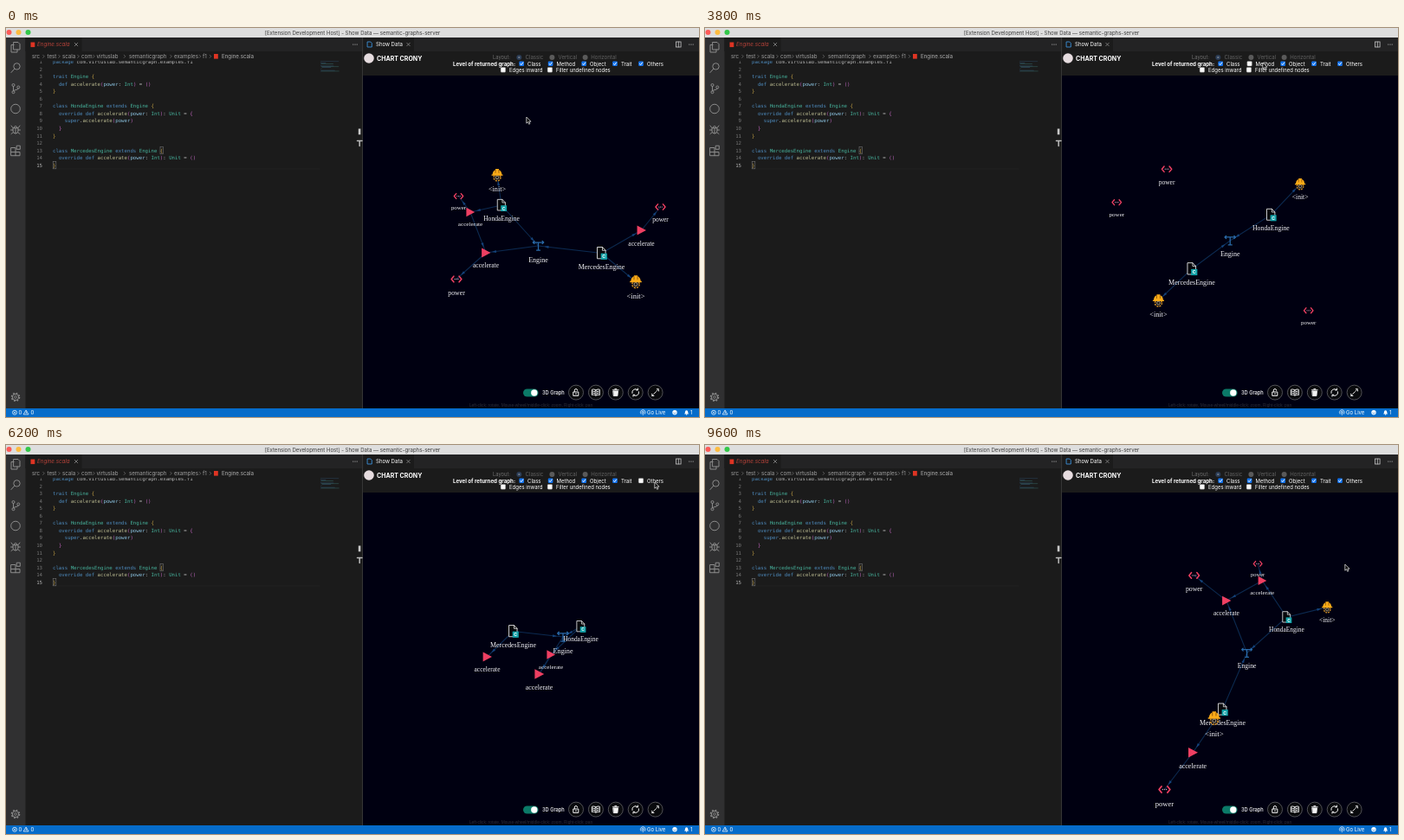
An HTML page that plays this animation: 800x450 px, repeating every 9650 ms.

```html
<!DOCTYPE html>
<html>
<head>
<meta charset="utf-8">
<style>
html, body { margin: 0; width: 100%; height: 100%; overflow: hidden; background: #1b1b1b; }
svg { display: block; width: 800px; height: 450px; font-family: Inter, sans-serif; }
.code { font-family: "DejaVu Sans Mono", monospace; font-size: 5.71px; opacity: .88; }
.label { font-family: "Liberation Serif", serif; font-size: 8px; fill: #f4f4f6; text-anchor: middle; }
.line { fill: none; stroke-linecap: round; stroke-linejoin: round; }
</style>
</head>
<body>
<svg id="stage" viewBox="0 0 800 450" xmlns="http://www.w3.org/2000/svg">
  <defs><clipPath id="view"><rect x="412" y="55" width="388" height="385"/></clipPath>
  <clipPath id="pane"><rect x="23" y="38.3" width="389" height="400"/></clipPath></defs>
  <g id="shell"></g>
  <g id="graph" clip-path="url(#view)"><g id="edges"></g><g id="nodes"></g></g>
  <g id="controls"></g>
  <path id="pointer" d="M0 0V7.2L1.7 5.7L2.9 8.3L4.1 7.7L3 5.2H5.2Z" fill="#111" stroke="#f2f2f2" stroke-width=".7"/>
</svg>
<script>
const LOOP = 9650, STEP = 50;
const $ = id => document.getElementById(id);
const rect = (x, y, w, h, fill, more = '') =>
  `<rect x="${x}" y="${y}" width="${w}" height="${h}" fill="${fill}" ${more}/>`;
const circle = (x, y, r, fill, more = '') => `<circle cx="${x}" cy="${y}" r="${r}" fill="${fill}" ${more}/>`;
const line = (d, color, w = 1, more = '') =>
  `<path class="line" d="${d}" stroke="${color}" stroke-width="${w}" ${more}/>`;
const esc = s => s.replace(/</g, '&lt;').replace(/>/g, '&gt;');
const text = (x, y, s, size, fill, more = '') =>
  `<text x="${x}" y="${y}" font-size="${size}" fill="${fill}" ${more}>${esc(s)}</text>`;
const at = (x, y, body) => `<g transform="translate(${x} ${y})">${body}</g>`;
const dots = (x, y) => [-2.2, 0, 2.2].map(d => circle(x + d, y, .6, '#c5c5c5')).join('');
const cross = (x, y) => line(`M${x - 1.8} ${y - 1.8}l3.6 3.6m0 -3.6l-3.6 3.6`, '#999', .7);

// ---------- window, activity bar, editor ----------
function windowFrame() {
  const lights = ['#fc5b57', '#fdbc40', '#34c84a'].map((c, i) => circle(3.5 + i * 11, 5, 3, c)).join('');
  return rect(0, 0, 800, 450, '#1b1b1b') + rect(0, 0, 800, 11, '#dedede') + lights +
    text(400, 7.7, '[Extension Development Host] - Show Data — semantic-graphs-server', 6.06, '#3c3c3c', 'text-anchor="middle"') +
    rect(0, 11, 22.5, 429, '#303031') + rect(22.5, 11, 777.5, 16, '#232324') +
    rect(22.5, 11, 65, 16, '#1b1b1b') + rect(412.5, 11, 58.5, 16, '#1b1b1b') +
    rect(411, 11, 1, 429, '#363636');
}

function activityBar() {
  const g = '#8b8b8b', l = (d, w = 1) => line(d, g, w);
  const teeth = circle(0, 0, 4.5, 'none', `stroke="${g}" stroke-width="1.6" stroke-dasharray="1.77 1.77"`);
  return at(11, 22, l('M-2 -5.5H3L5 -3.5V3H-2ZM-2 -2.5H-5V6H2V3')) +
    at(11, 46, l('M-1.5 1.5L-5 5.5') + circle(1.5, -1.6, 3.7, 'none', `stroke="${g}"`)) +
    at(11, 70, [[-2.5, -4], [-2.5, 4.2], [3.3, -1.5]].map(p => circle(...p, 1.5, 'none', `stroke="${g}"`)).join('') +
      l('M-2.5 -2.5V2.7M3.3 0C3.3 2 -1 1 -2.3 2.6')) +
    circle(11, 93.5, 5.3, 'none', `stroke="${g}"`) +
    at(11, 117, l('M-3 -1V2a3 3 0 0 0 6 0V-1ZM-2 -1a2 2.5 0 0 1 4 0M-5.5 1H-3M3 1H5.5M-5 -4L-3 -1.5M5 -4L3 -1.5M-5 5.5L-2.6 3.6M5 5.5L2.6 3.6M0 -1V5')) +
    at(11, 141.5, l('M-5 -3H0V2H5V6.2H-5ZM0 2V6.2M-5 2H0M1.6 -5.3H5.3V-1.2H1.6Z')) +
    at(11, 427, teeth + circle(0, 0, 3.6, 'none', `stroke="${g}"`) + circle(0, 0, 1.4, 'none', `stroke="${g}" stroke-width=".8"`));
}

const CODE = `package com.virtuslab.semanticgraph.examples.f1

trait Engine {
  def accelerate(power: Int) = ()
}

class HondaEngine extends Engine {
  override def accelerate(power: Int): Unit = {
    super.accelerate(power)
  }
}

class MercedesEngine extends Engine {
  override def accelerate(power: Int): Unit = ()
}`.split('\n');

function tint(word, row, col) {
  if (/^(package|trait|class|extends|override|def|super)$/.test(word)) return '#569cd6';
  if (/[{}]/.test(word)) return col > 40 || (row === 9) ? '#da70d6' : '#e0b84c';
  if (/[()]/.test(word)) return '#d070d0';
  if (/^[A-Z]/.test(word)) return '#4ec9b0';
  if (word === 'accelerate') return '#d4d4a4';
  if (word === 'power') return '#9cdcfe';
  return '#cfcfcf';
}

function editor() {
  let out = '';
  CODE.forEach((src, row) => {
    const y = (41 + row * 8.56).toFixed(2);
    out += text(42, y, String(row + 1), 5.71, row === 14 ? '#c8c8c8' : '#858585', 'text-anchor="end"');
    for (const m of src.matchAll(/\w+|\S/g))
      out += text((54 + m.index * 3.44).toFixed(2), y, m[0], 5.71, tint(m[0], row, m.index));
  });
  out += line('M54 163H362', '#262626', .8);
  for (const [x, y] of [[178, 137.6], [54.2, 154.6]])
    out += rect(x, y, 3.6, 8.2, 'none', 'stroke="#808080" stroke-width=".6"');
  let map = '';
  CODE.forEach((src, i) => {
    const pad = src.search(/\S/);
    if (pad >= 0) map += rect(363 + pad * .45, 38.5 + i * .86, (src.length - pad) * .45, .55, i % 2 ? '#386c6a' : '#35597a');
  });
  const crumbs = [[30, 'src'], [47.5, 'test'], [65, 'scala'], [87, 'com'], [104.5, 'virtuslab'],
    [142, 'semanticgraph'], [194, 'examples'], [227, 'f1']];
  const gaps = [43.5, 61.5, 83.5, 101.5, 137, 190.5, 224, 236];
  return `<g class="code" clip-path="url(#pane)">${out}${map}</g>` +
    rect(28.5, 16.5, 4.8, 5.6, '#de3423') + text(36, 21.2, 'Engine.scala', 6.2, '#b8433a', 'font-style="italic"') +
    cross(81, 19) + dots(403, 19) +
    crumbs.map(([x, s]) => text(x, 35, s, 6.2, '#a0a0a0')).join('') +
    gaps.map(x => line(`M${x - .8} 31.2l1.6 1.6l-1.6 1.6`, '#858585', .6)).join('') +
    rect(240, 30, 4.8, 5.6, '#de3423') + text(249, 35, 'Engine.scala', 6.2, '#b0b0b0') +
    rect(406.8, 116.5, 2.6, 6.8, '#c8c8c8') + line('M405.5 130.5H411M408.2 130.5V136.5', '#bbb', 1.5);
}

function statusBar() {
  const w = '#fff', blue = '#066cca';
  return rect(0, 440, 800, 10, blue) +
    circle(10, 444.8, 2.5, 'none', 'stroke="#fff" stroke-width=".7"') + line('M9 443.8l2 2m0 -2l-2 2', w, .6) +
    text(14.5, 447, '0', 6, w) + line('M23.3 442.3L26 447H20.6ZM23.3 443.9V445.5', w, .7) + text(28.5, 447, '0', 6, w) +
    line('M733 446.4a2.9 2.9 0 1 1 4.6 0M734.2 445.3a1.3 1.3 0 1 1 2.2 0M735.3 444.7V447.7', w, .7) +
    text(740, 447, 'Go Live', 6, w) +
    circle(772, 444.7, 2.7, w) + line('M770.6 445.4q1.4 1.6 2.8 0', blue, .6) +
    `<path d="M783 446.5q1 -1 1 -2.6a1.6 1.6 0 0 1 3.2 0q0 1.6 1 2.6Z" fill="#fff"/>` + circle(785.6, 447, .8, w) +
    text(790, 447, '1', 6, w);
}

// ---------- graph panel ----------
const BOXES = [[595.2, 602, 'Class'], [628.6, 635.6, 'Method'], [667.2, 674, 'Object'], [703, 710, 'Trait'], [733, 740, 'Others']];
const whiteBox = (x, y) => rect(x - 2.8, y - 2.8, 5.6, 5.6, '#f8f8f8', 'rx="1" stroke="#777" stroke-width=".4"');

function panel() {
  const radio = (x, on) => circle(x, 34, 3, on ? '#2c3e57' : '#5a5a5a') + (on ? circle(x, 34, 1.1, '#78808c') : '');
  return line('M417.5 16H420.8L422.3 17.5V22H417.5Z', '#3b8fd9', .9) + text(427, 21.2, 'Show Data', 6.05, '#fff') + cross(464.5, 19) +
    rect(773.5, 16, 5.6, 6, 'none', 'stroke="#c5c5c5" stroke-width=".8"') + line('M776.3 16V22', '#c5c5c5', .8) + dots(791, 19) +
    rect(412, 55, 388, 385, '#000011') +
    circle(419, 35, 5.8, '#e6dcdf') + text(428, 37.6, 'CHART CRONY', 7.02, '#fff', 'font-weight="700"') +
    text(562, 36.2, 'Layout:', 5.8, '#707070') +
    radio(592.3, 1) + radio(630.4) + radio(668.6) +
    [[599.5, 'Classic'], [637.5, 'Vertical'], [675.3, 'Horizontal']].map(([x, s]) => text(x, 36.2, s, 6.1, '#636363')).join('') +
    text(588, 43.7, 'Level of returned graph:', 6.15, '#fff', 'font-weight="700" text-anchor="end"') +
    BOXES.map(([, x, s]) => text(x, 43.7, s, 6, '#fff')).join('') +
    whiteBox(573.9, 48.4) + whiteBox(627.9, 48.4) +
    text(581, 50.7, 'Edges inward', 6, '#fff') + text(635, 50.7, 'Filter undefined nodes', 5.92, '#fff');
}

function controls() {
  const icons = [
    'M-2.8 -.6H2.8V3.8H-2.8ZM-1.7 -.8V-2.4a1.7 1.7 0 0 1 3.4 0M0 1V2.2',
    'M0 -2.6C-1.5 -3.8 -3 -3.8 -4.4 -3.3V3C-3 2.5 -1.5 2.5 0 3.6C1.5 2.5 3 2.5 4.4 3V-3.3C3 -3.8 1.5 -3.8 0 -2.6ZM0 -2.6V3.4M-3.2 -1.4l2 .5M-3.2 .6l2 .5M3.2 -1.4l-2 .5M3.2 .6l-2 .5',
    'M-3.4 -2.8H3.4M-1 -4H1M-2.6 -1.6H2.6L2.1 4H-2.1Z',
    'M-3.8 .8A3.9 3.9 0 0 1 2.5 -3M2.7 -4.6V-2.7H.8M3.8 -.8A3.9 3.9 0 0 1 -2.5 3M-2.7 4.6V2.7H-.8',
    'M-3.8 3.8L3.8 -3.8M1.7 -3.9H3.9V-1.7M-1.7 3.9H-3.9V1.7'];
  const extras = { 2: 'style="fill:#f4f4f4"', 4: 'stroke-dasharray="2.4 1.2"' };
  return rect(597, 417.4, 17.6, 9.2, '#0b7a68', 'rx="4.6"') + circle(609.8, 422, 3.7, '#fff') +
    text(619, 424.2, '3D Graph', 5.7, '#fff', 'font-weight="500"') +
    icons.map((d, i) => at(658 + i * 22.9, 421.6, circle(0, 0, 8.5, '#090a0d', 'stroke="#646468" stroke-width=".8"') +
      line(d, '#f4f4f4', 1, extras[i]))).join('') +
    text(606, 437.8, 'Left-click: rotate, Mouse-wheel/middle-click: zoom, Right-click: pan', 4.83, '#2c2d38',
      'text-anchor="middle" style="font-family:\'Liberation Sans\',sans-serif"') +
    `<g id="boxes"></g>`;
}

const ICONS = {
  trait: line('M-6 -4H6M0 -4V5M-2 5H2M-4.6 -5.6L-6.2 -4L-4.6 -2.4M4.6 -5.6L6.2 -4L4.6 -2.4', '#2a6aa8', 1.25),
  class: `<path d="M-5 -7H1L4.6 -3.2V6.3H-5Z" fill="#08080c" stroke="#e4e4e4" stroke-width=".9"/>` +
    line('M1 -7V-3.2H4.6', '#e4e4e4', .8) + rect(-.8, .2, 7.2, 7.2, '#12a2a8') +
    text(2.8, 5.8, 'C', 5.4, '#fff', 'text-anchor="middle" font-weight="700"'),
  init: circle(0, 2.8, 3.9, '#14121a', 'stroke="#c98a24" stroke-width="1.5" stroke-dasharray="1.9 1.16"') +
    circle(0, 2.8, 1.8, '#17151c', 'stroke="#d8c69c" stroke-width=".7"') +
    `<path d="M-6.4 .8V-.6H-5.4C-5.2 -3.8 -3.4 -5.4 -2 -5.8V-6.9H2V-5.8C3.4 -5.4 5.2 -3.8 5.4 -.6H6.4V.8Z" fill="#fbab18"/>` +
    line('M-1.9 -5.6V-2.6M1.9 -5.6V-2.6', '#8a5208', .8),
  method: `<path d="M-5.2 -5.8L5.8 0L-5.2 5.8Z" fill="#ee3f62"/>`,
  param: line('M-3.2 -3.4L-6 0L-3.2 3.4M3.2 -3.4L6 0L3.2 3.4', '#ee3f62', 1.6) +
    [-2, 0, 2].map(x => circle(x, 0, .65, '#c6a3b8')).join('')
};

const NODES = {
  E: ['trait', 'Engine'], H: ['class', 'HondaEngine'], M: ['class', 'MercedesEngine'],
  iH: ['init', '<init>'], iM: ['init', '<init>'],
  aE: ['method', 'accelerate'], aH: ['method', 'accelerate'], aM: ['method', 'accelerate'],
  pE: ['param', 'power'], pH: ['param', 'power'], pM: ['param', 'power']
};
const EDGES = 'H>E M>E H>iH M>iM E>aE H>aH M>aM aH>aE aE>pE aH>pH aM>pM'.split(' ').map(e => e.split('>'));

// "id x y labelSize" entries
const pose = s => Object.fromEntries(s.split(',').map(p => {
  const [id, ...v] = p.trim().split(' ');
  return [id, v.map(Number)];
}));

const opening = pose('E 614.5 252 8,H 572 205 7.6,M 687.5 260.5 8,iH 567 170 8.1,iM 727 293.5 8.5,aE 554 260 7.5,aH 536 213 7.1,aM 733.5 234 7.6,pE 520 290.5 7.8,pH 522.5 194.5 6.9,pM 755.5 207 7.4');
const noClass = pose('E 583 255 8.8,iH 711 114 6.1,aE 556.5 264 8.2,aH 558 250 7.3,aM 744.5 346 7.6,pE 511 277.5 8.8,pH 557 234.5 6.8,pM 711.5 365 7.2');
const upright = pose('E 612 227 8.1,H 637.5 287.5 8,M 627.5 160.5 7.9,iH 673 315 8.4,iM 615 113 8,aE 562.5 269 7.9,aH 596 306.5 7.3,aM 653.5 152 7.3,pE 515 278.5 8.2,pH 591 308.5 6.8,pM 672 165 6.5');
const noMethod = pose('E 606 246 8,H 655 215 7.8,M 560 280 8,iH 690 178 7.6,iM 520 318 8.2,pE 530 160 7.5,pH 700 330 7,pM 470 200 7');
const mirrored = pose('E 604 254.5 8.1,H 632.5 188.5 8,M 540 268 7.6,iH 643.5 232 7.8,iM 540.5 294 7.3,aE 682 258 8.2,aH 697.5 195 7.9,aM 510 225 7.4,pE 714.5 284 8.2,pH 711 184 7.2,pM 513.5 192 6.9');
const noOthers = pose('E 643 222 8.2,H 663.5 210 7.4,M 585.5 215.5 7.9,aE 615.5 265 7.9,aH 629 242.5 7.1,aM 555.5 245 7.5');
const tall = pose('E 626.5 240.5 7.7,H 672 199.5 7.4,M 597.5 305 7.9,iH 718.5 188 7.5,iM 587 312.5 8.9,aE 602 181 7.5,aH 642 160 7,aM 564 353 8,pE 564 154 7.8,pH 636 142 6.5,pM 531.5 395 8.5');
const DRIFT = { E: [-1, 0], H: [-1, 0], M: [0, .5], iH: [-1, 0], iM: [1, 3], aE: [0, -.5], aH: [1, -2.5], aM: [-.5, 2], pE: [1, -2.5], pH: [2, -4], pM: [-.5, 2.5] };

// Each reload bursts from the middle and passes through its pose at time `key`.
const SCENES = [
  { from: 0, pose: opening },
  { from: 1150, key: 1550, tau: 600, pose: noClass, off: 0 },
  { from: 2150, key: 2850, tau: 200, pose: upright },
  { from: 3150, key: 3900, tau: 350, pose: noMethod, off: 1 },
  { from: 4150, key: 4950, tau: 220, pose: mirrored },
  { from: 5850, key: 6200, tau: 500, pose: noOthers, off: 4 },
  { from: 7000, key: 8250, tau: 260, pose: tall, drift: true }
];
const MID = [612, 245];
const PATH = [[0, 602, 107], [400, 602, 107], [950, 608, 45], [2300, 608, 45], [2750, 645, 44],
  [4700, 645, 44], [4950, 655, 46], [5500, 750, 47], [7300, 750, 47], [7850, 740, 142], [LOOP, 740, 142]];

const clamp = k => Math.max(0, Math.min(1, k));
const smooth = k => k * k * (3 - 2 * k);

function place(scene, t) {
  const grow = s => 1 - Math.exp(-s / scene.tau);
  const g = scene.tau ? grow(t - scene.from + STEP) / grow(scene.key - scene.from + STEP) : 1;
  const k = scene.drift ? clamp((t - 8250) / 1350) : 0;
  const out = {};
  for (const id in scene.pose) {
    const [x, y, size] = scene.pose[id], [dx, dy] = DRIFT[id];
    out[id] = [MID[0] + (x - MID[0]) * g + dx * k, MID[1] + (y - MID[1]) * g + dy * k, size];
  }
  return out;
}

function drawEdges(spots) {
  return EDGES.filter(([a, b]) => spots[a] && spots[b]).map(([a, b]) => {
    const [x1, y1] = spots[a], [x2, y2] = spots[b];
    const len = Math.hypot(x2 - x1, y2 - y1) || 1;
    const angle = Math.atan2(y2 - y1, x2 - x1) * 180 / Math.PI;
    const k = Math.max(.5, 1 - 9 / len);
    return line(`M${x1} ${y1}L${x2} ${y2}`, '#0c2a50', 1.1) +
      `<path d="M2 0L-3 -1.5V1.5Z" fill="#14427a" transform="translate(${x1 + (x2 - x1) * k} ${y1 + (y2 - y1) * k}) rotate(${angle})"/>`;
  }).join('');
}

function pointerAt(t) {
  const i = PATH.findIndex(p => p[0] > t), [t0, x0, y0] = PATH[i - 1], [t1, x1, y1] = PATH[i];
  const k = smooth((t - t0) / (t1 - t0));
  return [x0 + (x1 - x0) * k - 1.2, y0 + (y1 - y0) * k - 4];
}

$('shell').innerHTML = windowFrame() + activityBar() + editor() + panel() + statusBar();
$('controls').innerHTML = controls();
$('nodes').innerHTML = Object.entries(NODES).map(([id, [kind, name]]) =>
  `<g id="n${id}">${ICONS[kind]}<text class="label" y="18.5">${esc(name)}</text></g>`).join('');

let shown = null;
function render(t) {
  const scene = SCENES.filter(s => s.from <= t).pop();
  const spots = place(scene, t);
  if (scene !== shown) {
    shown = scene;
    $('boxes').innerHTML = BOXES.map(([x], i) => i === scene.off ? whiteBox(x, 41.3) :
      rect(x - 2.8, 38.5, 5.6, 5.6, '#1475f0', 'rx="1"') + line(`M${x - 1.5} 41.4l1.1 1.3l2 -2.8`, '#fff', .9)).join('');
    Object.keys(spots).sort((a, b) => spots[a][2] - spots[b][2]).forEach(id => $('nodes').append($('n' + id)));
  }
  $('edges').innerHTML = drawEdges(spots);
  for (const id in NODES) {
    const p = spots[id], el = $('n' + id);
    el.style.display = p ? '' : 'none';
    if (p) el.setAttribute('transform', `translate(${p[0].toFixed(2)} ${p[1].toFixed(2)}) scale(${p[2] / 8})`);
  }
  $('pointer').setAttribute('transform', `translate(${pointerAt(t).map(v => v.toFixed(2))})`);
}

const start = performance.now();
function tick() {
  const t = (performance.now() - start) % LOOP;
  render(Math.floor(t / STEP) * STEP);
  requestAnimationFrame(tick);
}
tick();
</script>
</body>
</html>
```
